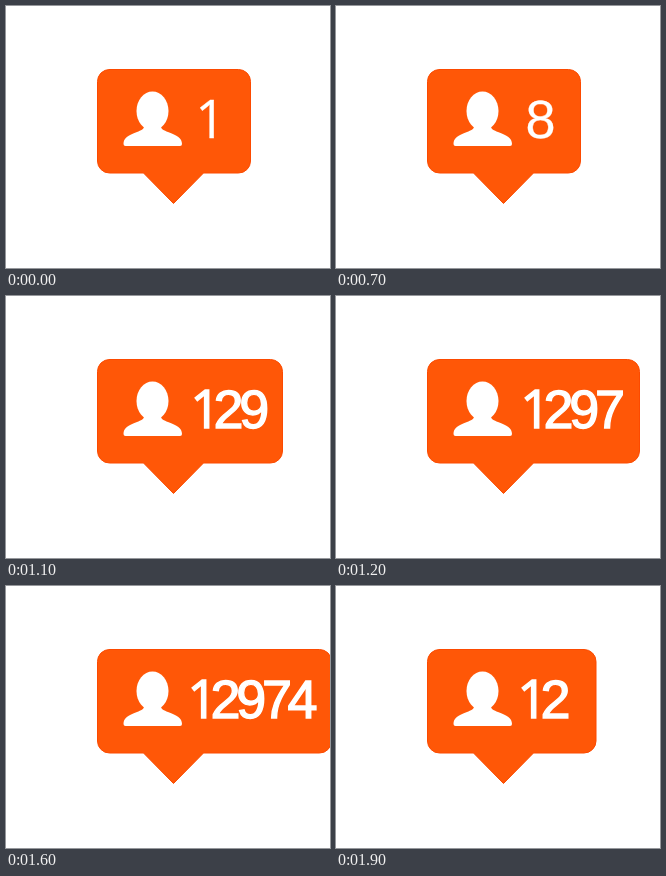
An HTML page that plays this animation: 324x262 px, repeating every 2000 ms.

```html
<!DOCTYPE html>
<html lang="en">
<head>
<meta charset="utf-8">
<title>Follower counter</title>
<style>
  html, body { margin: 0; width: 100%; height: 100%; overflow: hidden; background: #fff; }
  svg { display: block; width: 324px; height: 262px; }
  text { font: 54px "Liberation Sans", Arial, sans-serif; text-anchor: middle; fill: #fff; stroke: #fff; }
  .one { font: 53px "Open Sans", "Noto Sans", sans-serif; }
</style>
</head>
<body>
<svg viewBox="0 0 324 262">
  <path id="bubble" fill="#ff5707" stroke="#fc4a00"/>
  <g fill="#fff">
    <ellipse cx="146.5" cy="105" rx="16" ry="19.5"/>
    <path d="M138 117V120.500C138 123 135 124.500 131 126C122 129.500 117.500 132 117.500 138Q117.500 140 119.500 140H174Q176 140 176 138C176 132 171 129.500 162 126C158 124.500 155 123 155 120.500V117Z"/>
  </g>
  <text id="count"></text>
</svg>
<script>
  const STEP = 100;
  const COUNTS = [1, 2, 3, 4, 5, 6, 7, 8, 9, 10, 12, 129, 1297, 12974,
                  83915, 83915, 12974, 1297, 129, 12].map(String);
  const RIGHT_EDGES = [245, 260.5, 277, 304, 326];
  const FALLING_FROM = 15;
  const ADVANCE = 25.7;
  const ADVANCE_AFTER_ONE = 23;

  const bubble = document.getElementById("bubble");
  const count = document.getElementById("count");
  let shown = -1;

  // Rounded speech bubble with a fixed tail and a movable right side.
  const bubblePath = right =>
    `M103 63.5H${right - 12.5}a12 12 0 0 1 12 12V155a12 12 0 0 1-12 12` +
    `H197.500L167.500 197.500L137.500 167H103.500a12 12 0 0 1-12-12V75.500a12 12 0 0 1 12-12Z`;

  function addDigit(digit, x) {
    const span = document.createElementNS("http://www.w3.org/2000/svg", "tspan");
    span.textContent = digit;
    span.setAttribute("x", x);
    span.setAttribute("y", 132);
    if (digit === "1") span.setAttribute("class", "one");
    count.append(span);
  }

  function show(index) {
    const digits = COUNTS[index];
    const single = digits.length === 1;
    let x = single ? 204.5 : index < FALLING_FROM ? 199.5 : 196.5;
    bubble.setAttribute("d", bubblePath(RIGHT_EDGES[digits.length - 1]));
    count.setAttribute("stroke-width", single ? 0.3 : 1.4);
    count.replaceChildren();
    for (const digit of digits) {
      addDigit(digit, x);
      x += digit === "1" ? ADVANCE_AFTER_ONE : ADVANCE;
    }
  }

  function tick() {
    const index = Math.floor(performance.now() / STEP) % COUNTS.length;
    if (index !== shown) show(shown = index);
    requestAnimationFrame(tick);
  }
  tick();
</script>
</body>
</html>
```
